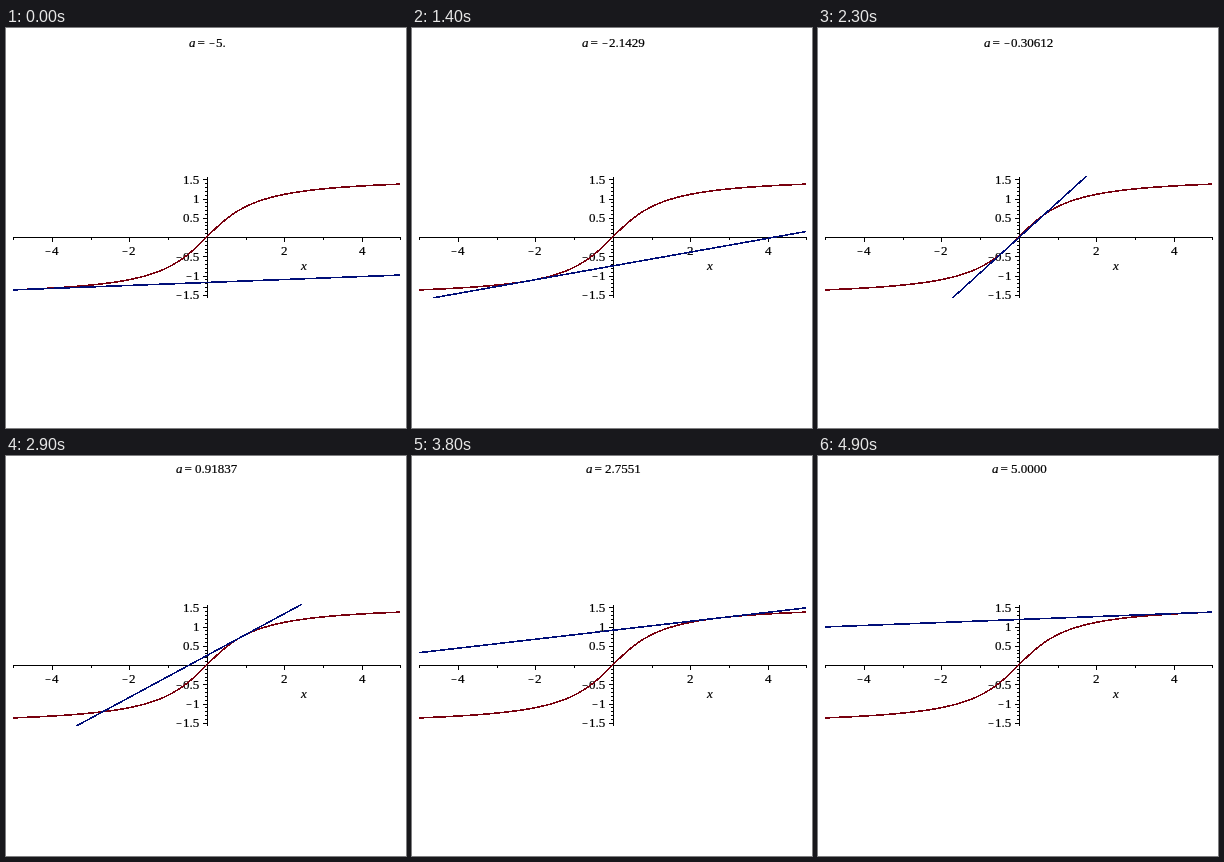
Write an HTML page that moves like this. It is 400 by 400 pixels and loops after 5 s.

```html
<!DOCTYPE html>
<html lang="en">
<head>
<meta charset="utf-8">
<title>Tangent to arctan</title>
<style>
  html, body { margin: 0; width: 100%; height: 100%; overflow: hidden; background: #fff; }
  svg { display: block; width: 400px; height: 400px; }
  text { font: 13px "Liberation Serif", "Times New Roman", serif; fill: #000; stroke: #000; stroke-width: 0.2; }
  .var { font-style: italic; }
  .minus { font-size: 10px; }
  path { fill: none; shape-rendering: crispEdges; }
  .axes { stroke: #000; stroke-width: 1; }
  .curve { stroke: #78000e; stroke-width: 1.6; }
  .tangent { stroke: #000e78; stroke-width: 1.6; }
</style>
</head>
<body>
<svg id="stage" viewBox="0 0 400 400"></svg>
<script>
const NS = "http://www.w3.org/2000/svg";
const stage = document.getElementById("stage");
const STEPS = 50, STEP_MS = 100;
const X_MAX = 5, Y_MAX = 1.58;
const px = x => 200.8 + 38.7 * x;
const py = y => 209 - 38.5 * y;

function add(tag, attrs, text = "") {
  const el = document.createElementNS(NS, tag);
  for (const key in attrs) el.setAttribute(key, attrs[key]);
  el.textContent = text;
  return stage.appendChild(el);
}

function label(x, y, text, cls = "") {
  return add("text", { x, y, class: cls }, text);
}

// Digits start at x; a minus sign hangs to their left.
function number(x, y, value) {
  label(x, y, Math.abs(value));
  if (value < 0) label(x - 6.8, y - 0.5, "\u2212", "minus");
}

function drawAxes() {
  let d = "M7 209.5H395M201.5 149V270";
  for (let x = -X_MAX; x <= X_MAX; x++) {
    const at = Math.round(px(x)) + 0.5;
    d += `M${at} 209V${x % 2 ? 212 : 214}`;
  }
  for (let i = -15; i <= 15; i++) {
    const at = Math.round(py(i / 10)) + 0.5;
    d += `M${i % 5 ? 199 : 197} ${at}H201`;
  }
  add("path", { d, class: "axes" });

  for (const x of [-4, -2, 2, 4]) number(Math.round(px(x)) + (x < 0 ? 0 : -3), 227, x);
  for (const y of [-1.5, -1, -0.5, 0.5, 1, 1.5]) {
    number(Number.isInteger(y) ? 187 : 177, Math.round(py(y) + 4.4), y);
  }
  label(295, 242, "x", "var");
}

function drawCurve() {
  const points = [];
  for (let i = -50; i <= 50; i++) {
    const x = i * X_MAX / 50;
    points.push(`${px(x).toFixed(2)} ${py(Math.atan(x)).toFixed(2)}`);
  }
  add("path", { d: "M" + points.join("L"), class: "curve" });
}

drawAxes();
drawCurve();
const tangent = add("path", { class: "tangent" });
const title = {
  name: label(0, 0, "a", "var"),
  equals: label(0, 0, "="),
  minus: label(0, 0, "\u2212", "minus"),
  digits: label(0, 0, "")
};

function place(el, x, y) {
  el.setAttribute("x", x);
  el.setAttribute("y", y);
}

function drawTangent(a) {
  const slope = 1 / (1 + a * a);
  const yAt = x => Math.atan(a) + slope * (x - a);
  const xAt = y => a + (y - Math.atan(a)) / slope;
  const left = Math.max(-X_MAX, xAt(-Y_MAX));
  const right = Math.min(X_MAX, xAt(Y_MAX));
  tangent.setAttribute("d",
    `M${px(left)} ${py(yAt(left))}L${px(right)} ${py(yAt(right))}`);
}

function drawTitle(a, step) {
  const text = step === 0 ? "5." : Math.abs(a).toPrecision(5);
  const offset = a < 0 ? 27 : 19;
  const width = offset + (text.length - 1) * 6.5 + 3.25;
  const x = Math.round(201 - width / 2);
  const y = a < 0 ? 19 : 17;
  title.digits.textContent = text;
  title.minus.style.display = a < 0 ? "" : "none";
  place(title.name, x, y);
  place(title.equals, x + 8.5, y);
  place(title.minus, x + offset - 6.8, y - 0.5);
  place(title.digits, x + offset, y);
}

let shown = -1;
function render(time) {
  const step = Math.floor(Math.max(0, time) / STEP_MS) % STEPS;
  if (step === shown) return;
  shown = step;
  const a = -X_MAX + 2 * X_MAX * step / (STEPS - 1);
  drawTangent(a);
  drawTitle(a, step);
}

const start = performance.now();
function tick() {
  render(performance.now() - start);
  requestAnimationFrame(tick);
}
tick();
</script>
</body>
</html>
```
